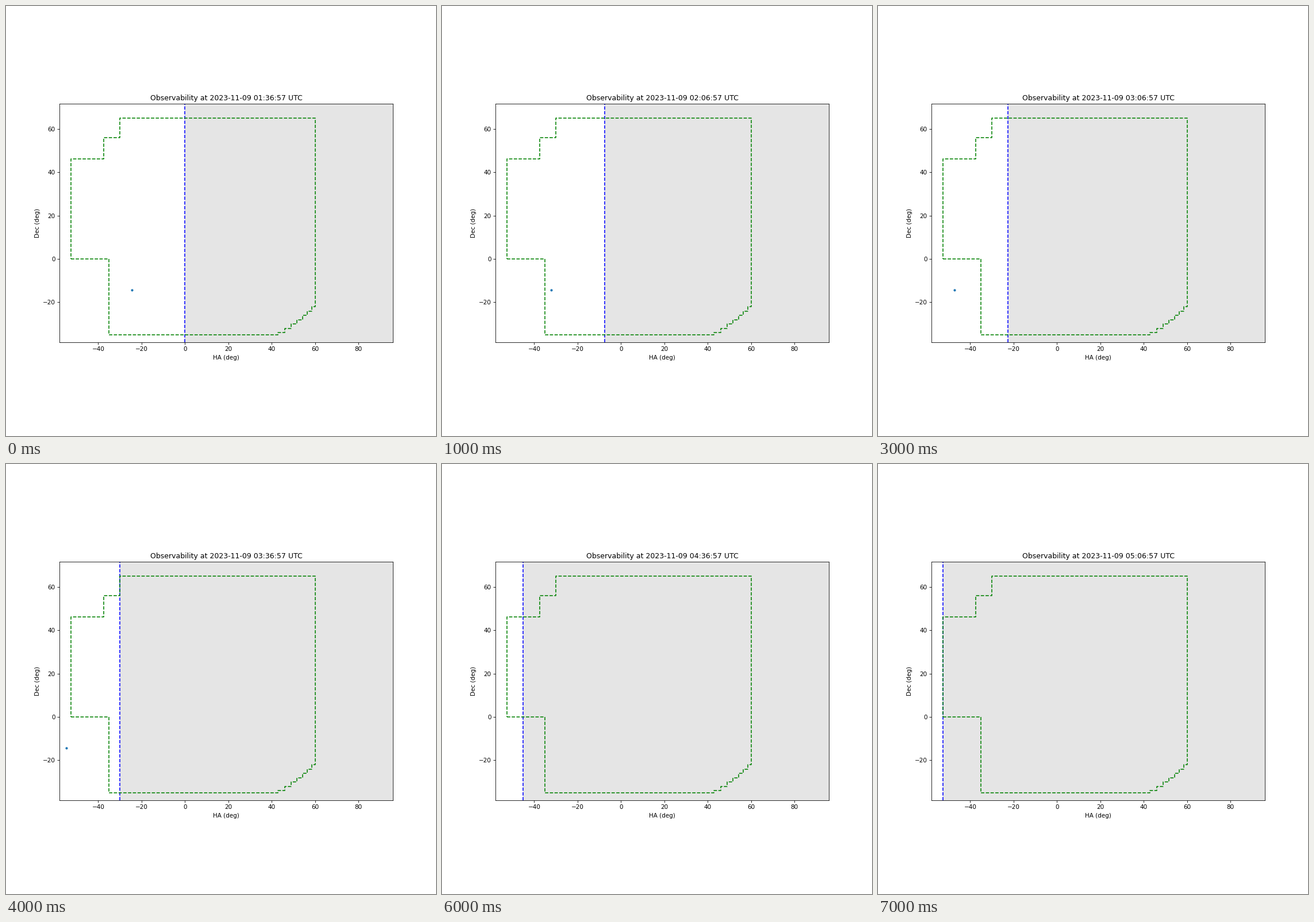
These frames come from a looping animation (748x748 px, 8 s). A matplotlib script:

```python
import numpy as np
import matplotlib.pyplot as plt
from matplotlib.animation import FuncAnimation
from matplotlib.patches import Rectangle

FRAMES = 8
START_MIN = 96             # 01:36 UTC
STEP_MIN = 30
SIDEREAL = 15.041 / 60     # degrees of hour angle per minute
X_MIN, X_MAX = -57.84, 95.94
Y_MIN, Y_MAX = -38.5, 71.5
STAR_HA, STAR_DEC = -24.6, -14.45
LATITUDE, MIN_ALTITUDE = np.radians([34.3, 10.82])


def horizon_ha(dec):
    """Hour angle at which a declination sinks to the lowest altitude."""
    d = np.radians(dec)
    cos_ha = ((np.sin(MIN_ALTITUDE) - np.sin(LATITUDE) * np.sin(d))
              / (np.cos(LATITUDE) * np.cos(d)))
    return np.degrees(np.arccos(cos_ha))


def limit_outline():
    """Corners of the telescope limits in hour angle and declination."""
    pts = [(-52.5, 0), (-35, 0), (-35, -35)]
    for dec in range(-34, -20, 2):
        ha = horizon_ha(dec)
        pts += [(ha, pts[-1][1]), (ha, dec)]
    pts += [(60, pts[-1][1]), (60, 65), (-30, 65), (-30, 56),
            (-37.5, 56), (-37.5, 46), (-52.5, 46), (-52.5, 0)]
    return zip(*pts)


fig, ax = plt.subplots(figsize=(10, 10), dpi=74.8)
fig.subplots_adjust(left=0.1245)
ax.set_aspect("equal")
ax.set_xlim(X_MIN, X_MAX)
ax.set_ylim(Y_MIN, Y_MAX)
ax.set_xlabel("HA (deg)")
ax.set_ylabel("Dec (deg)")
title = ax.set_title("")

shade = ax.add_patch(Rectangle((0, Y_MIN), X_MAX, Y_MAX - Y_MIN,
                               facecolor="#e5e5e5", edgecolor="none"))
star, = ax.plot([STAR_HA], [STAR_DEC], ".", color="C0", markersize=6)
edge = ax.axvline(0, color="blue", linestyle="--")
ax.plot(*limit_outline(), color="green", linestyle="--")


def update(i):
    elapsed = STEP_MIN * i
    shift = SIDEREAL * elapsed
    hours, minutes = divmod(START_MIN + elapsed, 60)
    title.set_text(f"Observability at 2023-11-09 {hours:02d}:{minutes:02d}:57 UTC")
    shade.set_x(-shift)
    shade.set_width(X_MAX + shift)
    edge.set_xdata([-shift, -shift])
    star.set_xdata([STAR_HA - shift])
    return title, shade, edge, star


anim = FuncAnimation(fig, update, frames=FRAMES, interval=1000,
                     repeat=True, repeat_delay=0, blit=False)
plt.show()
```
